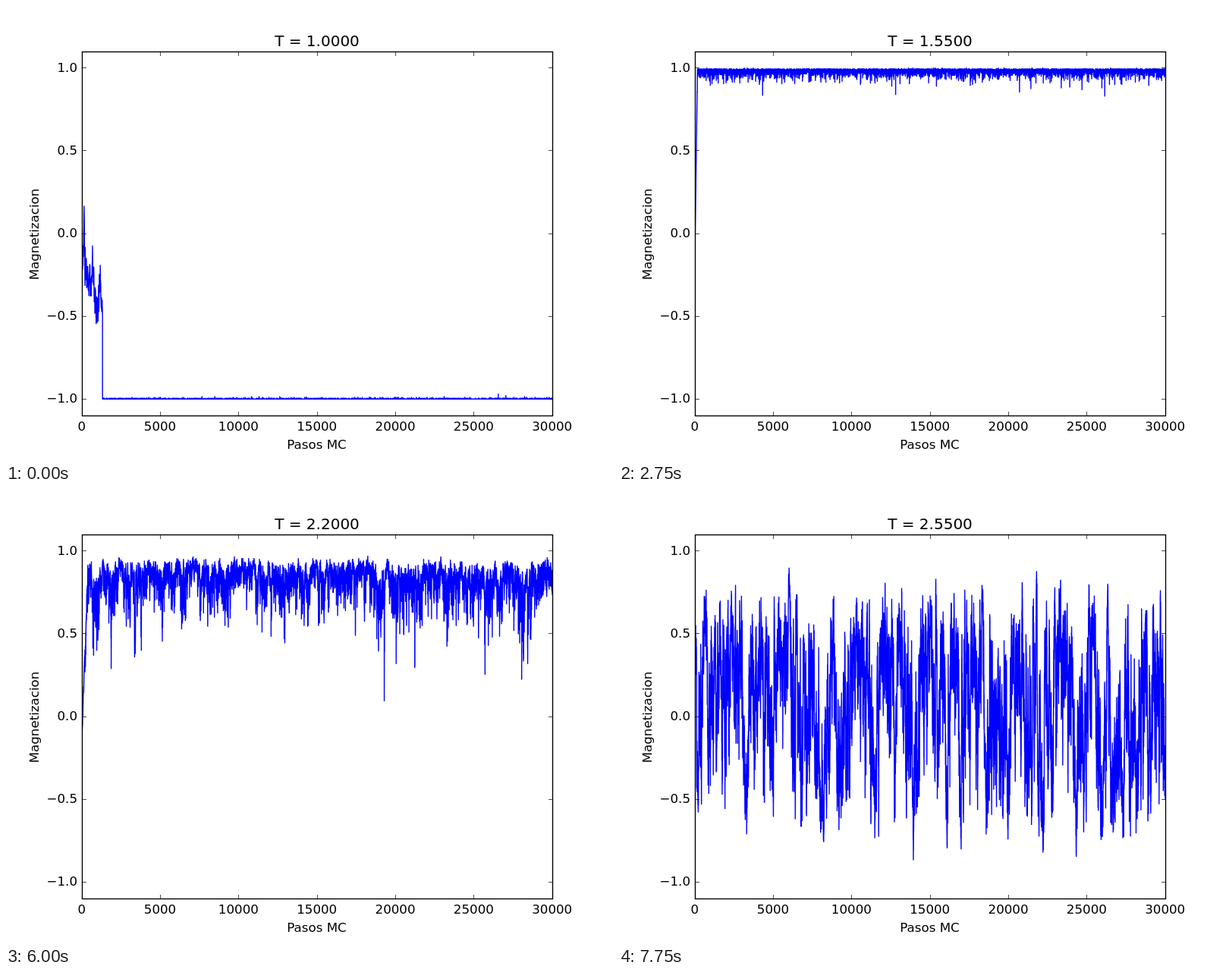
Animation of 800x600 px, one loop 8000 ms. Source, as an HTML page:

```html
<!DOCTYPE html>
<html lang="es">
<head>
<meta charset="utf-8">
<title>Magnetizacion</title>
<style>
  html, body { margin: 0; width: 100%; height: 100%; overflow: hidden; background: #fff; }
  svg { display: block; }
  text { font: 16.67px "DejaVu Sans", sans-serif; fill: #000; }
  .mid { text-anchor: middle; }
  .end { text-anchor: end; }
  #title { font-size: 20px; }
  #curve { fill: none; stroke: #00f; stroke-width: 1.39; stroke-linejoin: round; }
  .box { fill: none; stroke: #000; stroke-width: 1.39; }
  .tick { fill: none; stroke: #000; stroke-width: .7; }
</style>
</head>
<body>
<svg id="plot" width="800" height="600" viewBox="0 0 800 600">
  <clipPath id="area"><rect x="100" y="60" width="621" height="481"/></clipPath>
  <rect width="800" height="600" fill="#fff"/>
  <path id="curve" clip-path="url(#area)"/>
  <path id="ticks" class="tick"/>
  <rect class="box" x="100.5" y="60.5" width="620" height="480"/>
  <text id="title" class="mid" x="410" y="53"></text>
  <text class="mid" x="409.5" y="584">Pasos MC</text>
  <text class="mid" transform="translate(43 301) rotate(-90)">Magnetizacion</text>
</svg>
<script>
const STEP_MS = 250, STEPS = 32, TOTAL = 30000, STRIDE = 3;
const QUENCH = 1315;   // MC steps before the coldest run orders
const $ = id => document.getElementById(id);
const px = s => 100 + s * 620 / TOTAL;
const py = m => 300 - m * 480 / 2.2;

function random(seed) {
  let a = seed * 7919 + 12345;
  return () => {
    a = a + 0x6D2B79F5 | 0;
    let t = Math.imul(a ^ a >>> 15, 1 | a);
    t = t + Math.imul(t ^ t >>> 7, 61 | t) ^ t;
    return ((t ^ t >>> 14) >>> 0) / 4294967296;
  };
}

// Unit Gaussian noise with correlation time tau, in MC steps
function noise(rnd, tau) {
  const rho = Math.exp(-STRIDE / tau), kick = Math.sqrt(1 - rho * rho);
  const gauss = () => Math.sqrt(-2 * Math.log(1 - rnd())) * Math.cos(2 * Math.PI * rnd());
  let z = gauss();
  return () => z = rho * z + kick * gauss();
}

// Below the critical point: skewed fluctuations under the spontaneous magnetization
function ordered(k, T, rnd) {
  const slowing = Math.exp((T - 2.2) * 9);
  const fast = noise(rnd, 2 + 8 * slowing), slow = noise(rnd, 2 + 85 * slowing);
  const m0 = (1 - Math.sinh(2 / T) ** -4) ** .125;
  const dev = Math.min(1 - m0, .17), skew = Math.max(.46, .9 - .5 * (T - 1));
  const sign = k % 7 ? 1 : -1;
  const start = rnd() * .3 - .15, rise = 300 * (T - 1);
  return s => {
    const z = .75 * fast() + .66 * slow();
    const m = Math.max(-1, 1 - Math.round(dev * Math.exp(skew * z) / .005) * .005);
    return sign * (s < rise ? start + (m - start) * s / rise : m);
  };
}

// Coldest run: wanders downwards, then snaps into order
function quenched(k, T, rnd) {
  const wander = noise(rnd, 70), settled = ordered(k, T, rnd);
  return s => s < QUENCH ? -.1 - .3 * s / QUENCH + .11 * wander() : settled(s);
}

// Near and above the critical point: slow reversals that get faster and weaker with T
function critical(k, T, rnd) {
  const slow = noise(rnd, 220 * Math.exp((2.55 - T) * 8)), fast = noise(rnd, 25);
  const depth = .45 + 2.2 * (2.55 - T);
  return () => Math.tanh(depth * Math.tanh(1.5 * slow()) + .25 * fast());
}

function trace(k, T) {
  const run = k === 0 ? quenched : T < 2.24 ? ordered : critical;
  const value = run(k, T, random(k + 1));
  const out = [];
  for (let s = 0; s <= TOTAL; s += STRIDE) {
    out.push(px(s).toFixed(2) + ' ' + py(value(s)).toFixed(1));
  }
  return 'M' + out.join('L');
}

function label(text, x, y, cls) {
  const el = document.createElementNS('http://www.w3.org/2000/svg', 'text');
  el.setAttribute('x', x);
  el.setAttribute('y', y);
  el.setAttribute('class', cls);
  el.textContent = text;
  $('plot').append(el);
}

function axes() {
  let d = '';
  for (let s = 0; s <= TOTAL; s += 5000) {
    const x = Math.floor(px(s)) + .5;
    d += `M${x} 60.5v5.5M${x} 540.5v-5.5`;
    label(s, px(s) - .3, 560, 'mid');
  }
  for (let m = -1; m <= 1; m += .5) {
    const y = Math.floor(py(m)) + .5;
    d += `M100.5 ${y}h5.5M720.5 ${y}h-5.5`;
    label(m.toFixed(1).replace('-', '\u2212'), 94, Math.round(py(m) + 5), 'end');
  }
  $('ticks').setAttribute('d', d);
}

const cache = [];
let shown = -1;
function frame() {
  const k = Math.floor(performance.now() / STEP_MS) % STEPS;
  if (k !== shown) {
    const T = 1 + k * .05;
    shown = k;
    $('curve').setAttribute('d', cache[k] ||= trace(k, T));
    $('title').textContent = 'T = ' + T.toFixed(4);
  }
  requestAnimationFrame(frame);
}
axes();
frame();
</script>
</body>
</html>
```
